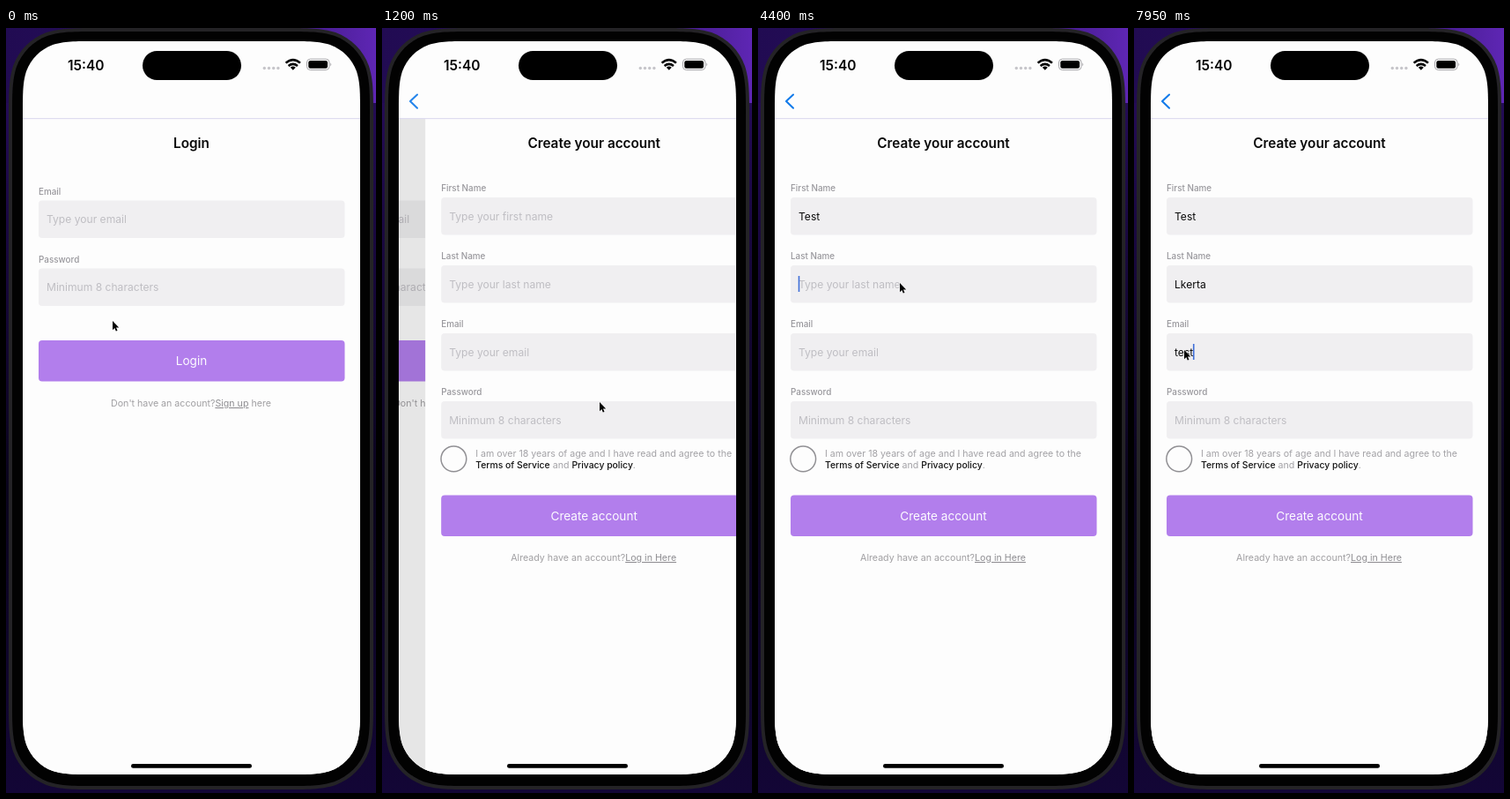
An HTML page that plays this animation: 420x867 px, repeating every 8 s.

```html
<!DOCTYPE html>
<html lang="en">
<head>
<meta charset="utf-8">
<title>Sign up flow</title>
<style>
  html, body { margin: 0; width: 100%; height: 100%; overflow: hidden; background: #08040f; }
  svg { display: block; width: 100vw; height: 100vh; }
  text { font-family: Inter, "Open Sans", sans-serif; white-space: pre; }
  .title { font-size: 15.3px; font-weight: 600; fill: #080808; text-anchor: middle; }
  .label { font-size: 9.9px; font-weight: 500; fill: #98979c; }
  .hint { font-size: 12.1px; fill: #bfbec3; }
  .value { font-size: 12.1px; fill: #0a0a0a; }
  .cta { font-size: 13.6px; fill: #fdfcff; text-anchor: middle; }
  .foot { font-size: 10.65px; fill: #a09fa2; text-anchor: middle; }
  .terms { font-size: 10.64px; fill: #a3a2a6; }
  .strong { font-size: 10.4px; font-weight: 500; fill: #141414; }
  .link { text-decoration: underline; fill: #8f8e92; }
</style>
</head>
<body>
<svg viewBox="0 0 420 867" preserveAspectRatio="none">
  <defs>
    <linearGradient id="desk" x2="1">
      <stop offset="0" stop-color="#210b52"/>
      <stop offset=".6" stop-color="#2a1062"/>
      <stop offset="1" stop-color="#5e26b4"/>
    </linearGradient>
    <linearGradient id="edge" x2="0" y2="1">
      <stop offset="0" stop-color="#2a0e62"/>
      <stop offset=".25" stop-color="#1a0842"/>
      <stop offset=".6" stop-color="#0a041c"/>
      <stop offset="1" stop-color="#130636"/>
    </linearGradient>
    <clipPath id="screen"><path id="glass"/></clipPath>
    <clipPath id="body"><rect x="19" y="103" width="383" height="743"/></clipPath>
  </defs>

  <rect width="420" height="867" fill="url(#edge)"/>
  <rect width="420" height="85" fill="url(#desk)"/>
  <path id="rim" fill="#242326"/>
  <path id="bezel" fill="#020202"/>

  <g clip-path="url(#screen)">
    <rect x="19" y="15" width="383" height="831" fill="#fdfdfd"/>
    <g clip-path="url(#body)">
      <g id="login"></g>
      <g id="signup"></g>
    </g>
    <rect x="19" y="102" width="383" height="1.2" fill="#dedcf0"/>
    <path id="back" d="M40 75.5 32 83l8 7.7" fill="none" stroke="#137bea" stroke-width="2.1" stroke-linecap="round" stroke-linejoin="round"/>
    <text x="70" y="47.8" font-size="15.5" font-weight="600" fill="#050505">15:40</text>
    <rect x="155" y="26" width="112" height="33" rx="16.5"/>
    <g id="dots" fill="#c6c5ca"></g>
    <g fill="none" stroke="#050505" stroke-width="2.5">
      <path d="M317.6 39.6q8.2-7 16.4 0M320.6 43q5.2-4.3 10.4 0"/>
    </g>
    <path d="M322.8 44.7q3-2.4 6 0l-3 3z"/>
    <rect x="341.5" y="35.2" width="25.5" height="12.3" rx="3.8" fill="none" stroke="#a6a5a9"/>
    <rect x="343.3" y="37" width="21.8" height="8.7" rx="2.3"/>
    <path d="M368.3 39.5q2 1.8 0 3.8z" fill="#a6a5a9"/>
    <rect x="142" y="834" width="137" height="4.8" rx="2.4"/>
  </g>
  <path id="mouse" d="M0 0v10.2l2.3-2.1 1.5 3.5 1.7-.7-1.5-3.5h3.2z" stroke="#fdfdfd" stroke-width=".7" paint-order="stroke"/>
</svg>

<script>
const $ = id => document.getElementById(id);
const LOOP = 8000, STEP = 50;
const PUSH = 967.4, OMEGA = 0.018;
const WIDTH = 383;

// Rounded box with continuous-curvature corners
function squircle(x, y, w, h, r) {
  const corner = [[1.5287, 0], [1.0885, 0], [.8684, 0], [.6315, .0749], [.3728, .1691],
    [.1691, .3728], [.0749, .6315], [0, .8684], [0, 1.0885], [0, 1.5287]];
  const back = [...corner].reverse();
  const place = (points, right, bottom) => points.map(([u, v]) =>
    [right ? x + w - u * r : x + u * r, bottom ? y + h - v * r : y + v * r]);
  const all = [place(corner, 0, 0), place(back, 0, 1), place(corner, 1, 1), place(back, 1, 0)];
  return all.map(([first, ...rest], i) => `${i ? 'L' : 'M'}${first}C${rest.join(' ')}`).join('') + 'Z';
}

$('glass').setAttribute('d', squircle(19, 15, 383, 831, 54));
$('rim').setAttribute('d', squircle(3, 0, 414, 863, 68));
$('bezel').setAttribute('d', squircle(7, 4, 406, 855, 64));

const text = (cls, x, y, s, extra = '') => `<text class="${cls}" x="${x}" y="${y}" ${extra}>${s}</text>`;
const box = (y, h, fill) => `<rect x="37" y="${y}" width="347.5" height="${h}" rx="4" fill="${fill}"/>`;
const link = s => `<tspan class="link">${s}</tspan>`;
const page = '<rect x="19" y="103" width="383" height="743" fill="#fdfdfd"/>';

function field(y, label, hint, id) {
  const typed = id ? text('value', 46, y + 25.6, '', `id="${id}"`) : '';
  return text('label', 37, y - 6.6, label) + box(y, 42.5, '#f0eff1') +
    `<rect id="${id}Mark" x="44" y="${y + 12}" width="0" height="18" fill="#b4cbe4"/>` +
    text('hint', 46, y + 25.6, hint, `id="${id}Hint"`) + typed;
}

const button = (y, s) => box(y, 46.5, '#b27eec') + text('cta', 210.5, y + 28.2, s);

$('login').innerHTML = page +
  text('title', 210.5, 135.8, 'Login') +
  field(195.5, 'Email', 'Type your email', '') +
  field(272.5, 'Password', 'Minimum 8 characters', '') +
  button(354, 'Login') +
  text('foot', 210, 429, `Don't have an account?${link('Sign up')} here`) +
  '<rect id="dim" x="19" y="103" width="383" height="743"/>';

$('signup').innerHTML = page +
  text('title', 210.5, 135.8, 'Create your account') +
  field(192, 'First Name', 'Type your first name', 'first') +
  field(269, 'Last Name', 'Type your last name', 'last') +
  field(346, 'Email', 'Type your email', 'mail') +
  field(423, 'Password', 'Minimum 8 characters', '') +
  '<circle cx="51.2" cy="488.3" r="14.4" fill="none" stroke="#919094" stroke-width="1.5"/>' +
  text('terms', 76, 486, 'I am over 18 years of age and I have read and agree to the') +
  `<text class="terms" x="76" y="498.7"><tspan class="strong">Terms of Service</tspan> and <tspan class="strong">Privacy policy</tspan>.</text>` +
  button(529.5, 'Create account') +
  text('foot', 210, 604, `Already have an account?${link('Log in Here')}`) +
  '<rect id="caret" width="1.6" height="18" fill="#3f6fd8"/>';

$('dots').innerHTML = [0, 1, 2, 3].map(i => `<circle cx="${293.3 + i * 5.2}" cy="45.5" r="1.7"/>`).join('');

// focus, start, blur and mark are times; gap is the delay between keys
const entries = [
  { id: 'first', y: 204, word: 'Test', focus: 2150, start: 2700, gap: 200, blur: 4350 },
  { id: 'last', y: 281, word: 'Lkerta', focus: 4350, start: 4700, gap: 140, blur: 6350, mark: 5500 },
  { id: 'mail', y: 358, word: 'test', focus: 6350, start: 7150, gap: 220, blur: LOOP }
];

// time, x, y of the pointer tip
const path = [
  [0, 121, 332], [250, 121, 332], [800, 257, 427], [1050, 257, 427], [1200, 247, 424],
  [1650, 129, 236], [1800, 129, 236], [2100, 131, 216], [3600, 131, 216], [4200, 161, 289],
  [5350, 161, 289], [5850, 59, 331], [6000, 59, 331], [6300, 57, 365], [LOOP, 57, 365]
];

function pointer(t) {
  const i = path.findIndex(p => p[0] > t);
  const [t0, x0, y0] = path[i - 1], [t1, x1, y1] = path[i];
  const u = (t - t0) / (t1 - t0), e = u * u * (3 - 2 * u);
  return [x0 + (x1 - x0) * e, y0 + (y1 - y0) * e];
}

// Critically damped spring
function spring(ms) {
  const w = Math.max(0, ms) * OMEGA;
  return 1 - (1 + w) * Math.exp(-w);
}

function type(t) {
  let caretOn = false;
  for (const e of entries) {
    const n = Math.min(e.word.length, Math.max(0, Math.floor((t - e.start) / e.gap) + 1));
    const value = $(e.id), focused = t >= e.focus && t < e.blur;
    value.textContent = e.word.slice(0, n);
    $(e.id + 'Hint').setAttribute('visibility', n ? 'hidden' : 'visible');
    const width = n ? value.getComputedTextLength() : 0;
    const marked = focused && e.mark && t >= e.mark;
    $(e.id + 'Mark').setAttribute('width', marked ? width + 2 : 0);
    if (!focused) continue;
    const since = t - (n ? e.start + (n - 1) * e.gap : e.focus);
    caretOn = since % 1000 < 550;
    $('caret').setAttribute('x', 45.7 + width);
    $('caret').setAttribute('y', e.y);
  }
  $('caret').setAttribute('visibility', caretOn ? 'visible' : 'hidden');
}

function draw(t) {
  const p = spring(t - PUSH);
  $('login').setAttribute('transform', `translate(${-0.3 * WIDTH * p})`);
  $('signup').setAttribute('transform', `translate(${WIDTH * (1 - p)})`);
  $('dim').setAttribute('opacity', 0.1 * p);
  $('back').setAttribute('opacity', p);
  type(t);
  $('mouse').setAttribute('transform', `translate(${pointer(t)})`);
}

const begin = performance.now();
function tick() {
  const t = (performance.now() - begin) % LOOP;
  draw(Math.floor(t / STEP) * STEP);
  requestAnimationFrame(tick);
}
tick();
</script>
</body>
</html>
```
